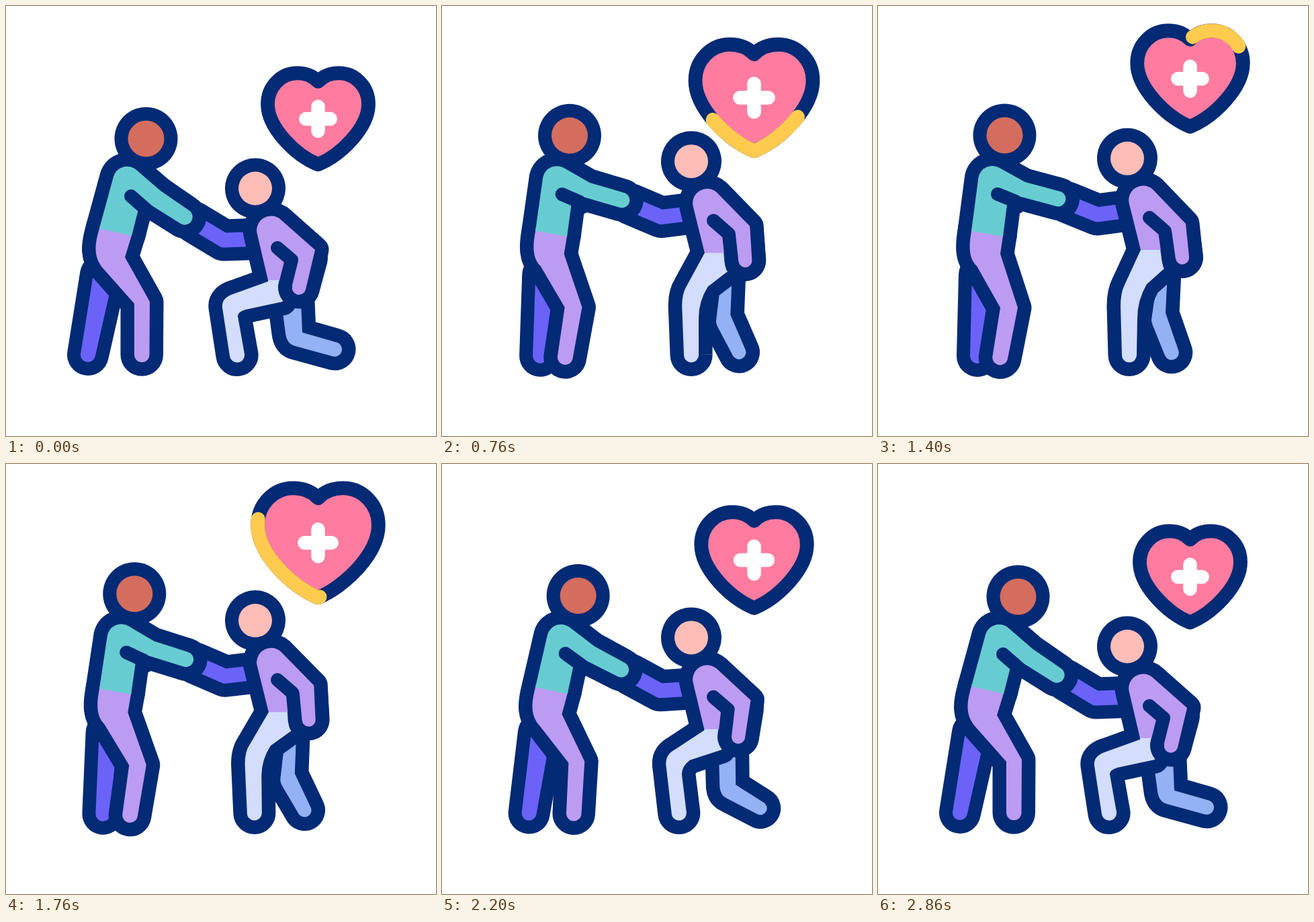
Animation of 640x640 px, one loop 3220 ms. Source, as an HTML page:

```html
<!DOCTYPE html>
<html lang="en">
<head>
<meta charset="utf-8">
<title>Helping hand</title>
<style>
  html, body { margin: 0; width: 100%; height: 100%; overflow: hidden; background: #fff; }
  svg { display: block; width: 100vw; height: 100vh; }
  path { stroke-linecap: round; stroke-linejoin: round; }
</style>
</head>
<body>
<svg id="stage" viewBox="0 0 640 640"></svg>
<script>
const LOOP = 3220;
const NAVY = '#022a75', TEAL = '#67ccd1', LILAC = '#bc9bf2', INDIGO = '#6b63f8',
      PALE = '#d3ddfd', BLUE = '#93b1f4', TAN = '#d46d5e', PEACH = '#febdb6',
      PINK = '#ff7ca0', YELLOW = '#ffcb4f';
const RIM = 41, LIMB = 22, WRAP = 62, CREASE = 20;
const NUMBER = /-?\d+(\.\d+)?/g;

const stage = document.getElementById('stage');
const parts = [];

function add(tag, attrs, parent = stage) {
  const el = document.createElementNS('http://www.w3.org/2000/svg', tag);
  for (const name in attrs) el.setAttribute(name, attrs[name]);
  return parent.appendChild(el);
}

// Whole numbers stay whole, since arc flags must be exactly 0 or 1.
const round = x => Math.round(x * 100) / 100;

// Mixes two path strings that share the same commands.
function mix(a, b, k) {
  const ends = b.match(NUMBER);
  let i = 0;
  return a.replace(NUMBER, n => round(+n + (ends[i++] - n) * k));
}

// Each shape is [kneeling pose, standing pose].
function part(who, shape, fill, stroke, width) {
  const el = add('path', { fill, stroke, 'stroke-width': width });
  parts.push({ who, shape, el });
}
const rim = (who, shape) => part(who, shape, NAVY, NAVY, RIM);
const body = (who, shape, color) => part(who, shape, color, 'none', 0);
const line = (who, shape, color, width) => part(who, shape, 'none', color, width);
function limb(who, shape, color) {
  line(who, shape, NAVY, WRAP);
  line(who, shape, color, LIMB);
}
function head(who, shape, color, outer, inner) {
  line(who, shape, NAVY, outer * 2);
  line(who, shape, color, inner * 2);
}

const helper = {
  backLeg: ['M141 400 L122 519 L149 400', 'M151 400 L148 521 L156 400'],
  legs: [
    'M140 327 L139 331 C131 358 131 374 144 390 L191 443 L191 519 A1 1 0 0 0 213.5 519 L214 440 L177 374 L188 338 Z',
    'M139.5 331 L139 335 C135 358 135 376 147 387 L182 449 L170.5 521 A1 1 0 0 0 193 525 L208 449 L182 369 L186.5 339 Z'],
  torso: [
    'M139 331 L160 254 A21 21 0 0 1 194 244 L230 275 L272 304 A1 1 0 0 1 260 324 L217 297 L197 303 L187 342 Z',
    'M139 335 L149.5 255 A21 21 0 0 1 180 240.5 L219 262 L271 276 A1 1 0 0 1 265 298 L213 284 L192 296 L186 343 Z'],
  crease: ['M186 283 L210 304', 'M178 280 L205 291'],
  head: ['M208.5 197.5 h0', 'M188.5 192.5 h0']
};

const helped = {
  arm: ['M280 322 L324 348.5 L368 347', 'M281 292 L326.5 310.5 L368 305'],
  backLeg: [
    'M411 450 L416 487 Q418 503 430 506 L486.5 521.5 A1 1 0 0 0 491.8 500.5 L441 486 L439 440 Z',
    'M415 410 L407 467 Q407 471 410 478 L427 520 A1 1 0 0 0 447 512 L428 457 L431 395 Z'],
  frontLeg: [
    'M391 404 L390 410 L340 428 Q320 434 322 449 L333 521 A1 1 0 0 0 355 518 L345 462 Q344 456 356 452 L412 440 L413 404 Z',
    'M392 359 L391 363 L367 415 Q361 427 361 447 L363 520 A1 1 0 0 0 385 519 L386 465 Q386 438 400 414 L427 390 L421 359 Z'],
  torso: [
    'M390 408 L374 340 A21.5 21.5 0 0 1 409 318 L460 363 L446 422 A1 1 0 0 1 426 417 L413 408 Z',
    'M391 363 L374 295 A21.5 21.5 0 0 1 409 273 L458 324 L463 373 A1 1 0 0 1 443 376 L421 363 Z'],
  forearm: ['M448 375 L436 419', 'M448 335 L453 374'],
  crease: ['M404 360 L425 378 L415 418', 'M404 315 L427 335 L434 385'],
  head: ['M371 271.5 h0', 'M371 226.8 h0']
};

limb('helped', helped.arm, INDIGO);

rim('helped', helped.backLeg);
body('helped', helped.backLeg, BLUE);
rim('helped', helped.frontLeg);
rim('helped', helped.torso);
body('helped', helped.frontLeg, PALE);
line('helped', helped.forearm, NAVY, WRAP);
body('helped', helped.torso, LILAC);
line('helped', helped.crease, NAVY, CREASE);
head('helped', helped.head, PEACH, 45, 25);

limb('helper', helper.backLeg, INDIGO);
rim('helper', helper.legs);
rim('helper', helper.torso);
body('helper', helper.legs, LILAC);
body('helper', helper.torso, TEAL);
line('helper', helper.crease, NAVY, CREASE);
head('helper', helper.head, TAN, 47, 27);

const HEART = 'M0 -55.5 C8 -64 19 -68 31 -68 C55 -68 75 -48 75 -22 C75 13 34 54 0 68 ' +
  'C-34 54 -75 13 -75 -22 C-75 -48 -55 -68 -31 -68 C-19 -68 -8 -64 0 -55.5 Z';
const heart = add('g', {});
const heartBody = add('path', { fill: PINK, stroke: NAVY, 'stroke-width': 20.8 }, heart);
const sweeps = [264, 1179].map(start => ({
  start,
  el: add('path', { fill: 'none', stroke: YELLOW, 'stroke-width': 21, pathLength: 1 }, heart)
}));
const plus = add('path', { stroke: '#fff', 'stroke-width': 20.5 }, heart);

const clamp = x => Math.min(1, Math.max(0, x));
const smooth = x => x * x * (3 - 2 * x);
const span = (t, start, time) => clamp((t - start) / time);

function bezier(x1, y1, x2, y2) {
  const at = (a, b, s) => 3 * (1 - s) * (1 - s) * s * a + 3 * (1 - s) * s * s * b + s * s * s;
  return x => {
    let lo = 0, hi = 1;
    for (let i = 0; i < 24; i++) {
      const mid = (lo + hi) / 2;
      if (at(x1, x2, mid) < x) lo = mid; else hi = mid;
    }
    return at(y1, y2, lo);
  };
}

const lift = { helper: bezier(.17, .17, .2, 1), helped: bezier(.37, 0, .2, 1) };
const sink = bezier(.45, 0, .4, 1);
const stand = (who, t) => lift[who](span(t, 0, 1200)) - sink(span(t, 1400, 1450));

// Two beats of 1200 ms each, then rest.
const beat = t => t > 0 && t < 2400 ? Math.sin(Math.PI * t / 1200) ** 2 : 0;

function drawHeart(t) {
  const rise = smooth(span(t, 20, 1440)) - smooth(span(t, 1400, 1440));
  const size = 1 + .2 * beat(t);
  const d = HEART.replace(NUMBER, n => round(n * size));
  heart.setAttribute('transform', `translate(464.5 ${round(167.9 - 60 * rise)})`);
  heartBody.setAttribute('d', d);
  for (const { start, el } of sweeps) {
    const front = smooth(span(t, start, 830));
    const tail = smooth(span(t, start + 170, 830));
    el.setAttribute('d', d);
    el.setAttribute('stroke-dasharray', `${front - tail} 2`);
    el.setAttribute('stroke-dashoffset', -tail);
    el.setAttribute('visibility', front - tail > .001 ? 'visible' : 'hidden');
  }
  const arm = 18.2 + 3 * beat(t - 200);
  plus.setAttribute('d', `M${-arm} 0 H${arm} M0 ${-arm} V${arm}`);
}

function draw() {
  const t = performance.now() % LOOP;
  const pose = { helper: stand('helper', t), helped: stand('helped', t) };
  for (const { who, shape, el } of parts) el.setAttribute('d', mix(shape[0], shape[1], pose[who]));
  drawHeart(t);
  requestAnimationFrame(draw);
}
draw();
</script>
</body>
</html>
```
